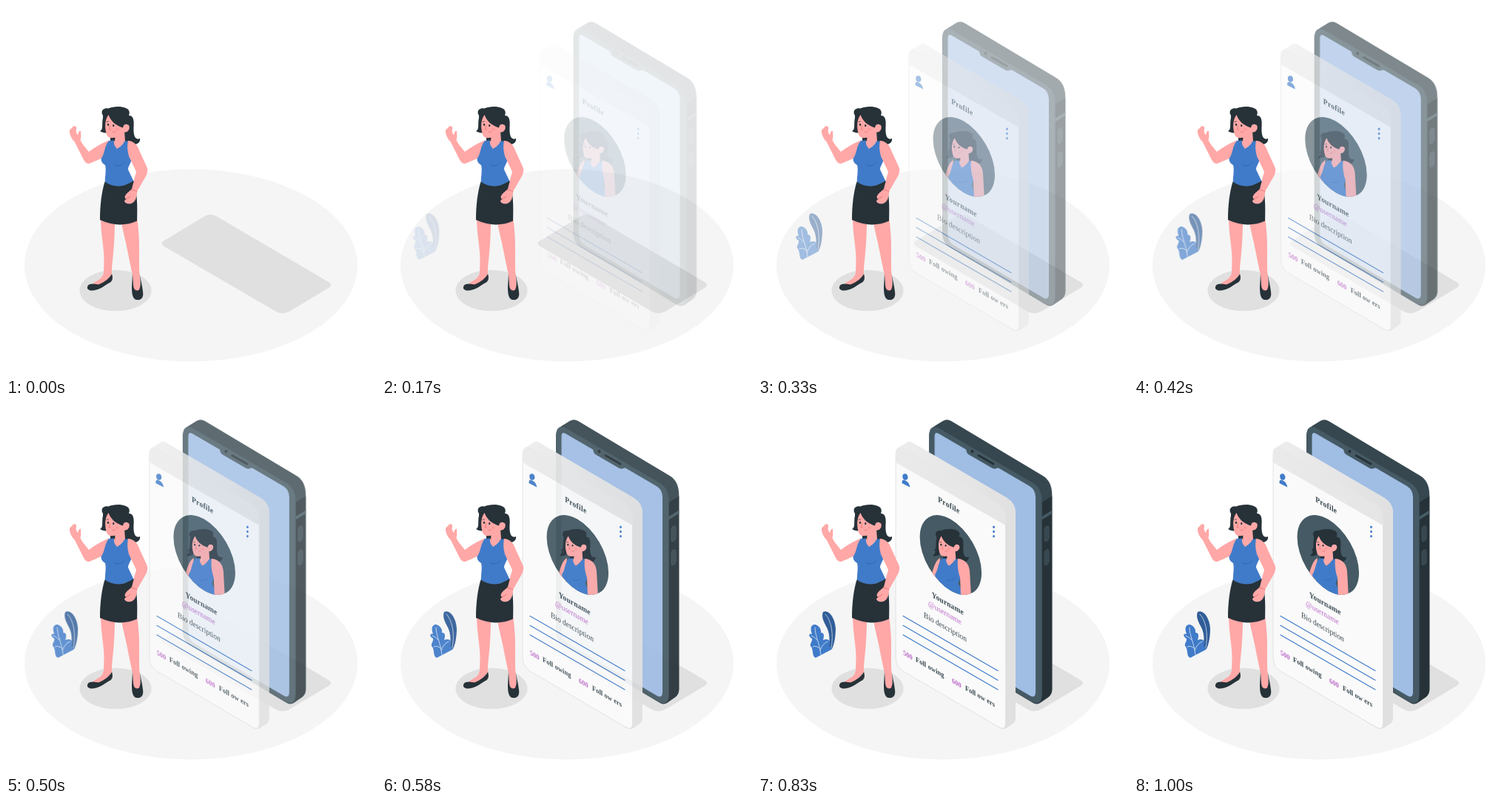
An HTML page for the animation above (1.04 s loop, 500 by 500 pixels).

```html
<!DOCTYPE html>
<html lang="en">
<head>
<meta charset="utf-8">
<title>Profile card</title>
<style>
  html, body { margin: 0; width: 100%; height: 100%; overflow: hidden; background: #fff; }
  svg { display: block; width: 100%; height: 100%; }
  .enter {
    animation: enter 1s cubic-bezier(.36, -.01, .5, 1.38) calc(var(--t, 0) * -1ms) both paused;
  }
  .phone, .card { --from: 30px; }
  .leaves { --from: -30px; }
  @keyframes enter {
    from { opacity: 0; transform: translateX(var(--from)); }
    to { opacity: 1; transform: none; }
  }
  text { font: 10.9px "Liberation Serif", "Times New Roman", serif; fill: #37474f; }
  .bold { font-weight: 700; letter-spacing: .15px; }
  .title { font-size: 10.9px; letter-spacing: .35px; }
  .stat { font-size: 9.8px; font-weight: 700; }
  .accent { fill: #ba68c8; }
  .skin { fill: #ffa8a7; }
  .dark { fill: #263238; }
  .slate { fill: #37474f; }
  .steel { fill: #455a64; }
  .blue { fill: #407bc9; }
  .line { fill: none; stroke-linecap: round; stroke-linejoin: round; }
</style>
</head>
<body>
<svg viewBox="0 0 500 500">
  <defs>
    <clipPath id="disc"><circle r="48.2" transform="matrix(.866 .5 0 1 262.3 204)"/></clipPath>
    <linearGradient id="edge"><stop stop-color="#ededed"/><stop offset="1" stop-color="#e0e0e0"/></linearGradient>
    <linearGradient id="header"><stop stop-color="#eaeaea"/><stop offset="1" stop-color="#e5e5e5"/></linearGradient>

    <g id="bust">
      <path class="dark" d="M131 148C127 142 132 137 138 138.500C146 134.500 162 135 166 141C167 143 167 146 166 148C173 148 173 156 172.500 164C172 174 174 182 181 179C182 185 176 188 170 187C166 188 162 186 160 182L140 170C137 172 131 172 127 169C132 167 129 160 131 151Z"/>
      <path class="skin" d="M146 174L160 168L161 183L150 195L145 186Z"/>
      <path class="dark" d="M141 178L147.500 177.500L147 182.500L141 182Z"/>
      <path class="blue" d="M139 182L146 181.500Q145 188 150 193Q157 189 160 183L165.500 182C164 190 166 198 170 206C169 213 165 216 165 221L172.500 237Q152 249 134 241C133 234 136 222 134 215C129 212 127 207 130 204C134 197 133 189 139 182Z"/>
      <path class="line" stroke="#2f61a8" stroke-width=".8" d="M146 215Q154 218 159 212"/>
      <path class="skin" d="M138.500 147C134 153 133 162 135.500 172C136.500 178 142 179.500 148 177.500C153 176 157 174 159 170.500C166 172 169 163 165 160.500C161 158.500 158.500 161 158 164.500C150 162 142 157 138.500 147Z"/>
      <ellipse class="dark" cx="138" cy="160.300" rx="1.200" ry="1.500"/>
      <ellipse class="dark" cx="145.200" cy="161.500" rx="1.200" ry="1.500"/>
      <path class="line" stroke="#263238" stroke-width=".7" d="M136 156.500L138.500 156M145 157L148 158.500"/>
      <path class="line" stroke="#e0706f" stroke-width=".8" d="M140.500 162L139.500 167H141.500M144.500 170.500L147.500 170"/>
      <circle cx="150" cy="167" r="2" fill="#ff9090" opacity=".6"/>
    </g>
  </defs>

  <ellipse cx="250" cy="350.500" rx="225" ry="130" fill="#f5f5f5"/>
  <path fill="#e0e0e0" d="M213 317.500L267 285Q276 279 285 284.500L436 373Q442 377 436 381L384 412Q375 418 365 413L214 325Q208 321 213 317.500Z"/>
  <ellipse cx="148" cy="384.500" rx="48.500" ry="27.800" fill="#e0e0e0"/>

  <g class="enter leaves">
    <path fill="#305d98" d="M86 281C93 277 102 288 103 303C103 315 101 325 98 331L92 333C95 323 96 312 91 302C88 296 83 288 86 281Z"/>
    <path class="line" stroke="#d5e1f2" stroke-width=".8" d="M89 284C97 292 101 311 96.500 332"/>
    <path class="blue" d="M76 343C71 341 73 334 70.500 329C66 324 72 322 71 317C66 314 66 310 71 310.500C68 303 70 298 75 298C80 299 84 304 83 309C88 309 87.500 314 86 319C93 316 97 320 94 327C96 328 98 330 97 332Z"/>
    <path class="line" stroke="#e4ecf7" stroke-width=".8" d="M75 302C75 313 81 322 83 339M70 313Q75 315 78 319M72 328Q77 326 81 330M92 321Q85 324 82 333"/>
  </g>

  <g class="enter phone">
    <path class="slate" d="M233 42Q233 34 241 29.500L252 22.800Q257 19.500 263 23L386 96.500Q399.300 104 399.300 123V386Q399.300 393 393 397L383 404Q378 407.500 371 402.500L243 326Q233 320 233 307Z"/>
    <path class="dark" d="M385.500 133L399.300 124.500V386Q399.300 393 393 397L380.500 405.200Q385.500 402 385.500 394Z"/>
    <path class="steel" d="M233.500 42Q233.500 26 248 33.500L373 106.500Q385.500 114 385.500 130V392Q385.500 409 371 401.500L243 326Q233.500 320 233.500 307Z"/>
    <path class="steel" d="M385.500 152L399.300 143.500V148L385.500 156.500Z"/>
    <g fill="#37474f" stroke="#4b5f69" stroke-width=".6">
      <path d="M389 170Q389 166 392 165Q395 164 395 168V181Q394 185 391 186Q389 186 389 183Z"/>
      <path d="M389 202Q389 198 392 197Q395 196 395 200V213Q394 217 391 218Q389 218 389 215Z"/>
    </g>
    <path fill="#a0bde4" d="M240.500 44Q240.500 37 246 40L283 61.500L284 65Q284.500 67 287 68.500L318 86.500Q322 88.500 325 86.500L327 86.500L369 111Q377 116 377 126V389Q377 398 370 394.500L248 323Q240.500 318 240.500 309Z"/>
    <ellipse class="dark" cx="291.500" cy="64" rx="1.900" ry="2.300"/>
    <path class="line" stroke="#263238" stroke-width="2.800" d="M300 69.500L320 81"/>
  </g>

  <g class="enter card">
    <path fill="url(#edge)" d="M188 69Q188 61 194 57.500L202 52.500Q207 49.500 212 53L338 126.500Q350 134 350 146V424Q350 429 346 432L337 438Q333 441 327 437L198 361Q188 355 188 343Z"/>
    <path fill="#e0e0e0" d="M336.500 150L350 142V424Q350 429 346 432L336.500 438.500Z"/>
    <path fill="#fafafa" stroke="#e2e2e2" d="M188 69Q188 55.500 198 60.500L325 134Q336.500 141 336.500 154V432Q336.500 442 327 436.500L198 361Q188 355 188 343Z"/>
    <path fill="url(#header)" d="M188 79V69Q188 55.500 198 60.500L325 134Q336.500 141 336.500 154V164Z"/>

    <g class="blue">
      <ellipse cx="200.800" cy="98.500" rx="3.500" ry="4.300" transform="rotate(-15 200.800 98.500)"/>
      <path d="M196.500 107Q196 101.500 200 103Q206 104.500 207.300 112.500Z"/>
      <ellipse cx="320.500" cy="166.300" rx="1.400" ry="1.800"/>
      <ellipse cx="320.500" cy="172.500" rx="1.400" ry="1.800"/>
      <ellipse cx="320.500" cy="178.800" rx="1.400" ry="1.800"/>
    </g>

    <g clip-path="url(#disc)">
      <rect class="steel" x="215" y="145" width="95" height="120"/>
      <path class="dark" d="M246 180C241 187 246 198 238 205C245 207 250 203 250 196Z"/>
      <path class="skin" d="M248 208C241 212 239 222 235 236L246 238Z"/>
      <use href="#bust" transform="translate(129.200 50.700) scale(.87)"/>
      <path class="skin" d="M272 209C282 210 287 216 288 226L290 262H276L275 235C272 226 271 218 272 209Z"/>
    </g>

    <text class="bold title" transform="matrix(.866 .5 0 1 245.200 131.700)">Profile</text>
    <text class="bold" transform="matrix(.866 .5 0 1 236.700 260.700)">Yourname</text>
    <text class="accent" transform="matrix(.866 .5 0 1 232 272.500)">@username</text>
    <text transform="matrix(.866 .5 0 1 226 288)">Bio description</text>
    <path class="line" stroke="#407bc9" stroke-width="1.200" d="M198 286.500L326 360.400M198 299.300L326 373.200M198 312.100L326 386"/>
    <text class="stat accent" transform="matrix(.866 .5 0 1 197.800 338.800)">500</text>
    <text class="stat" transform="matrix(.866 .5 0 1 215 347.800)">Foll<tspan dx="3">owing</tspan></text>
    <text class="stat accent" transform="matrix(.866 .5 0 1 264 376.500)">600</text>
    <text class="stat" transform="matrix(.866 .5 0 1 282 386.500)">Foll<tspan dx="2.700">ow</tspan><tspan dx="2.700">ers</tspan></text>
  </g>

  <g>
    <path class="skin" d="M128 286C128 308 132.500 326 132.500 342L132 360C131 368 124 371 117 375L124 378L142 369L143 361C143 345 147 330 147 288Z"/>
    <path class="skin" d="M155 288C158 305 163 322 166 340L171 364L172 383L180 386L182 380L180.500 362C179 340 182 320 177 286Z"/>
    <path class="dark" d="M143 362C145 368 144 373 138 375C132 379 124 385 115 384.500C110 384 108 380 112 376.500C117 374 122 377 126 376C133 373 140 368 143 362Z"/>
    <path class="dark" d="M171 362L170 380C170 388 171 396 176 397C184 398 186 393 185 386C184 377 182 370 180.500 362C182 372 182.500 380 179.500 384C175 385.500 172.500 383 172 377Z"/>
    <path class="skin" d="M86 171C85 166 89 166 90 163.500C93 161 96 163 95 166C94 170 96 173 97 174C98 171 99 167.500 101 169C101 173 102 177 100.500 181C103 187 109 193 112 197C119 192 128 186 139 181.500L140 198L130 205.500L115 212C111 214 108 213 105 208L93 184C89 180 87 176 86 171Z"/>
    <use href="#bust"/>
    <path class="dark" d="M133.500 237.500Q152 250 172.500 236C177 250 178 270 177 290.500Q153 301 127 289C127 270 129 252 133.500 237.500Z"/>
    <path class="skin" d="M165 182C174 183 178 189 180 195L190.500 218C192 222 191 225 189.500 229L177 251C177 258 175 265 169 267C164 268 160 266 160 263L163 260.500C160 261 160 257 162 255C165 251 169 249 170 247L176 224L166 203C164 195 163.500 189 165 182Z"/>
    <path class="line" stroke="#dc6d70" stroke-width=".8" d="M162 261L168 257.500M170 248.500Q174 248.500 177 251"/>
  </g>
</svg>
<script>
  const LOOP = 1040, STEP = 1000 / 24, LEAD = 34;
  const root = document.documentElement;
  const start = performance.now();

  // The motion advances at 24 steps per second.
  function draw() {
    const time = (performance.now() - start) % LOOP;
    const step = Math.floor((time + 5) / STEP);
    root.style.setProperty("--t", (step * STEP + LEAD).toFixed(2));
    requestAnimationFrame(draw);
  }
  draw();
</script>
</body>
</html>
```
